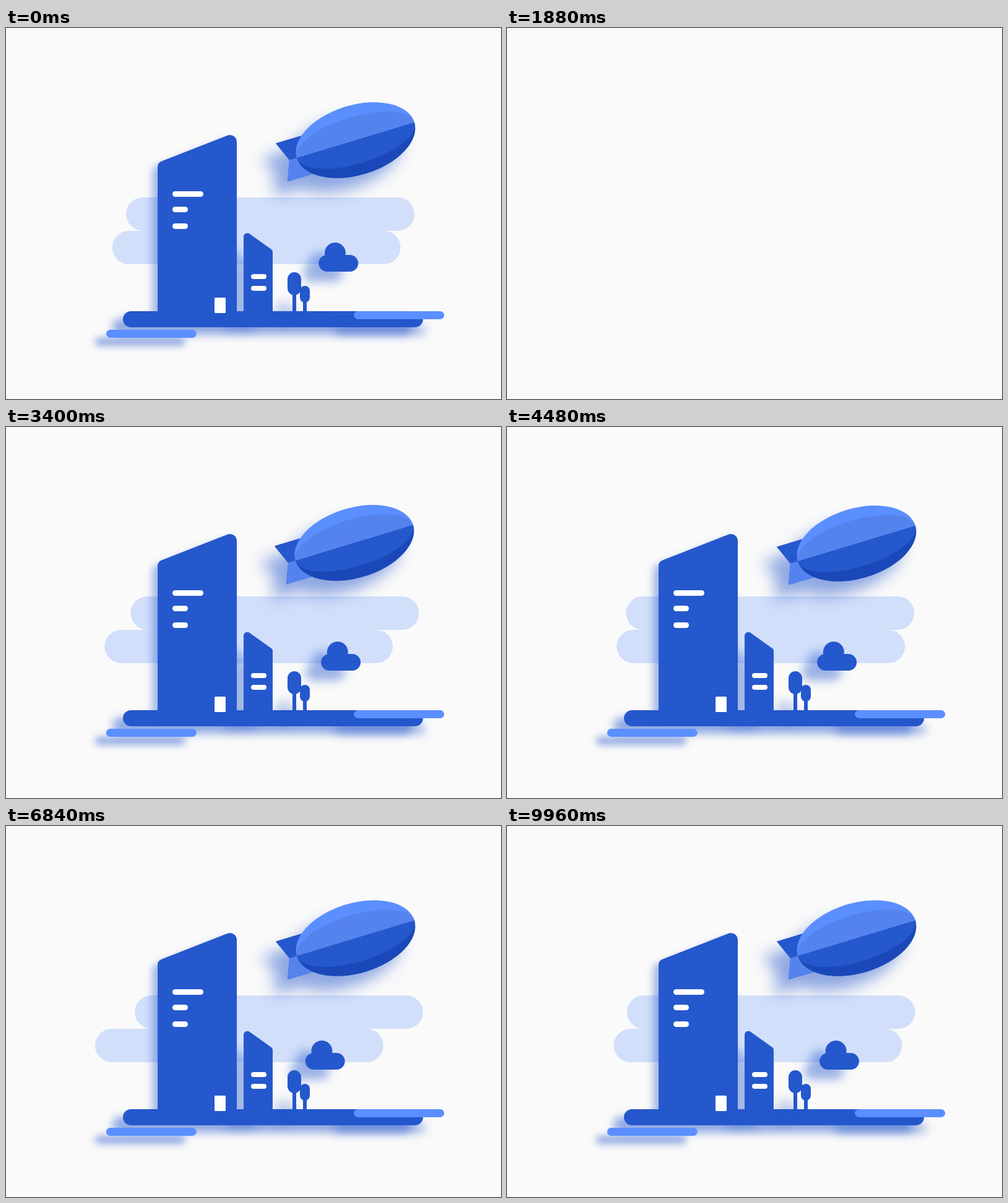
Recreate the animation shown at these times as an HTML page with a canvas. Size 800 by 600 pixels, loop 10000 ms.

```html
<!DOCTYPE html>
<html lang="en">
<head>
<meta charset="utf-8">
<title>Airship over the city</title>
<style>
  html, body { margin: 0; width: 100%; height: 100%; overflow: hidden; background: #fafafa; }
  canvas { display: block; width: 800px; height: 600px; }
</style>
</head>
<body>
<canvas id="stage" width="800" height="600"></canvas>
<script>
const ctx = document.getElementById('stage').getContext('2d');
const LOOP = 10000, STEP = 40, TURN = 1960;
const PAPER = '#fafafa', BLUE = '#2558cc', LIGHT = '#5b8fff', MID = '#5583ee',
      DEEP = '#1a48b8', PALE = '#d2dffa', WHITE = '#ffffff';

const progress = (s, start, length) => Math.min(1, Math.max(0, (s - start) / length));
const expoOut = p => p >= 1 ? 1 : 1 - 2 ** (-10 * p);
const backOut = p => 1 + 2.7 * (p - 1) ** 3 + 1.7 * (p - 1) ** 2;
const sineInOut = p => (1 - Math.cos(Math.PI * p)) / 2;

const grow = (s, start, length = 600) => {
  const p = progress(s, start, length);
  return p > 0 ? Math.max(0, backOut(p)) : 0;
};
const slide = (s, from, start, length) => from * (1 - expoOut(progress(s, start, length)));

// Eased value through [time, value] stops.
function sway(s, stops) {
  let value = stops[0][1];
  for (let i = 1; i < stops.length; i++) {
    const [t0, v0] = stops[i - 1], [t1, v1] = stops[i];
    if (s > t0) value = v0 + (v1 - v0) * sineInOut(progress(s, t0, t1 - t0));
  }
  return value;
}

function fill(path, color, shadow) {
  ctx.save();
  if (shadow) {
    const [dx, dy, sigma, alpha] = shadow;
    ctx.shadowColor = `rgba(37,88,204,${alpha})`;
    ctx.shadowOffsetX = dx;
    ctx.shadowOffsetY = dy;
    ctx.shadowBlur = sigma * 2;
  }
  ctx.fillStyle = color;
  ctx.fill(path);
  ctx.restore();
}

function pill(x, y, w, h, r = Math.min(w, h) / 2) {
  const path = new Path2D();
  path.roundRect(x, y, w, h, r);
  return path;
}

function polygon(points) {
  const path = new Path2D();
  points.forEach(([x, y]) => path.lineTo(x, y));
  path.closePath();
  return path;
}

// Draws with scaling around a fixed point; nothing at zero size.
function scaled(cx, cy, sx, sy, draw) {
  if (sx <= 0 || sy <= 0) return;
  ctx.save();
  ctx.translate(cx, cy);
  ctx.scale(sx, sy);
  ctx.translate(-cx, -cy);
  draw();
  ctx.restore();
}

function tower(left, right, leftTop, rightTop, rLeft, rRight) {
  const path = new Path2D(), base = 461;
  path.moveTo((left + right) / 2, base);
  path.arcTo(left, base, left, leftTop, 4);
  path.arcTo(left, leftTop, right, rightTop, rLeft);
  path.arcTo(right, rightTop, right, base, rRight);
  path.arcTo(right, base, left, base, 4);
  path.closePath();
  return path;
}

const bigTower = tower(245, 373, 218, 168, 10, 11);
const smallTower = tower(384, 431, 326, 359.5, 6, 5);
const bigWindows = [[269, 264, 50, 9], [269, 289, 25, 9], [269, 316, 25, 9]];
const smallWindows = [[396, 398, 25, 8], [396, 417, 25, 8]];

function drawBars(s) {
  if (s <= 80) return;
  const upper = sway(s, [[500, 211.2], [2350, 192], [4400, 208]]) + slide(s, 610, 80, 520);
  const lower = sway(s, [[450, 143], [2500, 177.2], [4700, 143.8]]) - slide(s, 610, 80, 520);
  fill(pill(upper, 274, 466, 54), PALE);
  fill(pill(lower, 328, 466, 54), PALE);
}

function drawGround(s) {
  if (s <= 80) return;
  fill(pill(189 - slide(s, 680, 80, 650), 458, 485, 26), BLUE, [-17, 12, 7, 0.5]);
}

function drawStrokes(s) {
  if (s <= 80) return;
  fill(pill(562.2 + slide(s, 270, 80, 1200), 458, 146, 13), LIGHT, [-31, 24, 8, 0.5]);
  fill(pill(161.8 - slide(s, 310, 80, 1080), 488, 146, 13), LIGHT, [-18, 13, 6, 0.5]);
}

function drawWindows(s, list, start) {
  list.forEach(([x, y, w, h], i) =>
    scaled(x, y, grow(s, start + i * 80, 500), 1, () => fill(pill(x, y, w, h), WHITE)));
}

function drawTree(s, start, x, top, w, h, shadow) {
  const cx = x + w / 2;
  scaled(cx, 459, 1, grow(s, start), () =>
    fill(pill(cx - 3, top + h - 6, 6, 465 - top - h, 0), BLUE));
  const size = grow(s, start + 110);
  scaled(cx, top + h, size, size, () => fill(pill(x, top, w, h), BLUE, shadow));
}

function drawCloud(s) {
  const size = grow(s, 660);
  const x = 505.3 - (s - 1960) * 0.0074;
  const cloud = pill(x, 367, 64, 27);
  const puff = new Path2D();
  puff.arc(x + 26.7, 364, 17, 0, Math.PI * 2);
  cloud.addPath(puff);
  scaled(x + 32, 380, size, size, () => fill(cloud, BLUE, [-25, 16, 8, 0.45]));
}

const TILT = -0.294, HULL = 99.3;
function hullHalf(b, lower) {
  const path = new Path2D();
  path.ellipse(565, 181.4, HULL, b, TILT, lower ? 0 : Math.PI, lower ? Math.PI : Math.PI * 2);
  path.closePath();
  return path;
}
const upperFin = polygon([[436, 186.6], [490, 170.4], [490, 204], [458, 213.6]]);
const lowerFin = polygon([[458, 213.6], [471, 209.8], [510, 232], [455, 248.2]]);
const silhouette = new Path2D();
silhouette.ellipse(565, 181.4, HULL - 0.5, 56, TILT, 0, Math.PI * 2);
silhouette.addPath(polygon([[436, 186.6], [490, 170.4], [510, 232], [455, 248.2], [458, 213.6]]));

function drawAirship(s) {
  if (s <= 600) return;
  const bob = 8 * (1 - Math.cos((s - 1940) / 1500 * Math.PI * 2)) / 2;
  ctx.save();
  ctx.translate(-slide(s, 700, 600, 1000), bob);
  fill(silhouette, BLUE, [-22, 24, 12, 0.5]);
  fill(upperFin, BLUE);
  fill(lowerFin, MID);
  fill(hullHalf(56.6, false), LIGHT);
  fill(hullHalf(56.6, true), DEEP);
  fill(hullHalf(38, false), MID);
  fill(hullHalf(38, true), BLUE);
  ctx.restore();
}

function drawScene(s) {
  ctx.fillStyle = PAPER;
  ctx.fillRect(0, 0, 800, 600);
  drawBars(s);
  drawGround(s);
  scaled(0, 461, 1, grow(s, 100, 550), () => fill(bigTower, BLUE, [-9, 8, 6, 0.4]));
  scaled(0, 461, 1, grow(s, 400, 625), () => fill(smallTower, BLUE, [-28, 26, 9, 0.4]));
  drawTree(s, 590, 455, 395, 22, 37, [-20, 48, 9, 0.25]);
  drawTree(s, 650, 475, 417, 16, 27, [-24, 30, 9, 0.25]);
  drawStrokes(s);
  drawWindows(s, bigWindows, 640);
  drawWindows(s, smallWindows, 760);
  scaled(346, 461, 1, grow(s, 455), () => fill(pill(337, 436, 18, 25, 1.5), WHITE));
  drawCloud(s);
  drawAirship(s);
}

// The scene unfolds for half the loop and folds back for the other half.
function frame() {
  const t = Math.floor(performance.now() / STEP) * STEP % LOOP;
  const half = LOOP / 2;
  drawScene(Math.abs((t - TURN + half + LOOP) % LOOP - half));
  requestAnimationFrame(frame);
}
frame();
</script>
</body>
</html>
```
